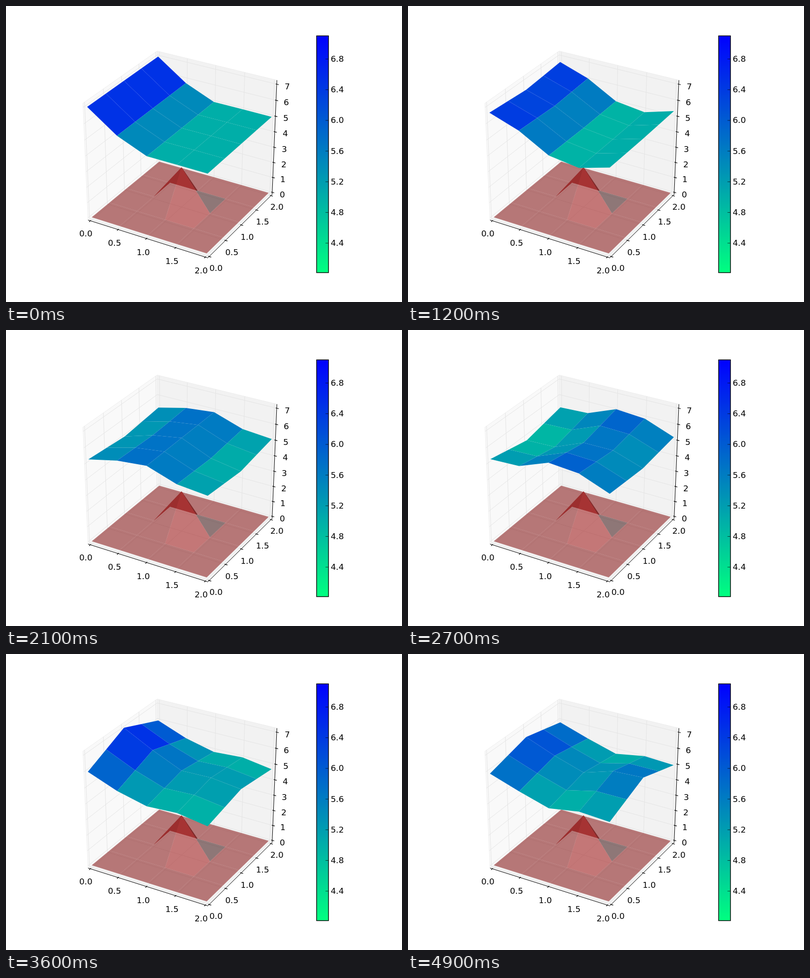
Animation of 800x600 px, one loop 5 s. Source, as an HTML page with a canvas:

```html
<!DOCTYPE html>
<html lang="en">
<head>
<meta charset="utf-8">
<title>Water surface over a peak</title>
<style>
  html, body { margin: 0; width: 100%; height: 100%; overflow: hidden; background: #fff; }
  canvas { display: block; }
</style>
</head>
<body>
<canvas id="stage" width="800" height="600"></canvas>
<script>
const ctx = document.getElementById('stage').getContext('2d');
const STEP = 100, STEPS = 50;
const ZMAX = 7.1, VMIN = 4.014, VMAX = 7.1;
const LO = -1 / 48, HI = 49 / 48;   // pane limits in unit space
const TICKS = [0, 0.5, 1, 1.5, 2];
const INK = '#000', GRID = '#e5e5e5';

// Standing waves of the basin: half waves along x and y, amplitude,
// degrees per step, phase. Waves along y build up as the peak scatters them.
const REST = 5.43;
const WAVES = [
  [1, 0, 0.765, 30.8, 0],
  [2, 0, 0.5, 58.8, 0],
  [3, 0, 0.24, 80, 0],
  [4, 0, 0.0625, 3, 0],
  [0, 2, 0.31, 55.4, -12],
  [1, 2, 0.16, 65.5, -33],
  [2, 2, 0.12, 83, 22]
];

function height(i, j, n) {
  const fade = Math.exp(-0.004 * n);
  const grow = Math.max(0, Math.min(1, (n - 4) / 24));
  return WAVES.reduce((z, [kx, ky, amp, speed, phase]) =>
    z + amp * (ky ? grow : fade) * Math.cos((speed * n + phase) * Math.PI / 180)
      * Math.cos(kx * i * Math.PI / 4) * Math.cos(ky * j * Math.PI / 4), REST);
}

// Perspective camera at elevation 30, azimuth -60; unit cube to pixels
function unit(x, y, z) {
  x -= 0.5; y -= 0.5; z -= 0.5;
  const r = Math.sqrt(3) / 2;
  const d = 10 - (r / 2 * x - 0.75 * y + 0.5 * z);
  return [354.7 + 2681 * (r * x + 0.5 * y) / d,
          293.5 - 2594.6 * (-0.25 * x + r / 2 * y + r * z) / d];
}
const at = (x, y, z) => unit(x / 2, y / 2, z / ZMAX);

function trace(pts) {
  ctx.beginPath();
  pts.forEach(p => ctx.lineTo(p[0], p[1]));
}
function fill(pts, color) {
  trace(pts);
  ctx.closePath();
  ctx.fillStyle = color;
  ctx.fill();
}
function line(pts, color, width = 1) {
  trace(pts);
  ctx.strokeStyle = color;
  ctx.lineWidth = width;
  ctx.stroke();
}
// Text centred on y, snapped to whole pixels
function text(s, x, y, centred = true) {
  ctx.font = '16.67px "DejaVu Sans", sans-serif';
  ctx.fillStyle = INK;
  const left = centred ? x - ctx.measureText(s).width / 2 : x;
  ctx.fillText(s, Math.round(left), Math.round(y + 6));
}

function drawPanes() {
  const a = unit(LO, LO, LO), b = unit(HI, LO, LO), c = unit(HI, HI, LO), d = unit(LO, HI, LO);
  const e = unit(LO, LO, HI), f = unit(HI, HI, HI), g = unit(LO, HI, HI);
  fill([a, d, g, e], '#f9f9f9');
  fill([d, c, f, g], '#f2f2f2');
  fill([a, b, c, d], '#f4f4f4');
  line([a, e, g, f], '#eeeeee');
  line([g, d], '#eeeeee');
  for (const t of TICKS) {
    const u = t / 2;
    line([unit(u, LO, LO), unit(u, HI, LO), unit(u, HI, HI)], GRID);
    line([unit(HI, u, LO), unit(LO, u, LO), unit(LO, u, HI)], GRID);
  }
  for (let z = 0; z <= 7; z++) {
    const w = z / ZMAX;
    line([unit(LO, LO, w), unit(LO, HI, w), unit(HI, HI, w)], GRID);
  }
}

function drawAxes() {
  line([unit(LO, LO, LO), unit(HI, LO, LO), unit(HI, HI, LO), unit(HI, HI, HI)], INK);
  const out = 1 / 60, inn = 1 / 120;
  TICKS.forEach((t, i) => {
    const u = t / 2, s = t.toFixed(1);
    line([unit(u, LO - out, LO), unit(u, LO + inn, LO)], INK, 1.2);
    line([unit(HI + out, u, LO), unit(HI - inn, u, LO)], INK, 1.2);
    text(s, 161.5 + 57.2 * i + 0.25 * i * i, 461 + 18.75 * i);
    text(s, 424 + 32.6 * i - 0.43 * i * i, 531.3 - 32.3 * i + 0.3 * i * i);
  });
  for (let z = 0; z <= 7; z++) {
    const w = z / ZMAX;
    line([unit(HI + out, HI, w), unit(HI - inn, HI, w)], INK, 1.2);
    text(String(z), 558.3 + 1.38 * z, 381.8 - 30.4 * z - 0.12 * z * z);
  }
}

function drawBed() {
  const red = r => `rgba(${r},0,0,0.51)`;
  for (let j = 3; j >= 0; j--) {
    for (let i = 0; i < 4; i++) {
      if (i % 3 && j % 3) continue;   // the peak covers the middle cells
      const x = i / 2, y = j / 2;
      fill([at(x, y, 0), at(x + .5, y, 0), at(x + .5, y + .5, 0), at(x, y + .5, 0)], red(125));
    }
  }
  const top = at(1, 1, 2.48);
  const west = at(.5, 1, 0), east = at(1.5, 1, 0), south = at(1, .5, 0), north = at(1, 1.5, 0);
  fill([top, east, at(1.5, 1.5, 0), north], red(45));
  fill([at(.5, .5, 0), south, top, west], red(127));
  fill([south, at(1.5, .5, 0), east, top], red(151));
  // far side seen through the near faces
  const split = [344, 361.8];
  fill([west, top, split, at(.5, 1.5, 0)], '#9c2e2e');
  fill([top, north, split], '#a63333');
  fill([top, north, [383.8, 374]], '#7c2a2a');
}

function drawWater(n) {
  for (let j = 3; j >= 0; j--) {
    for (let i = 0; i < 4; i++) {
      let sum = height(i, j, n);   // the first corner counts twice in the colour
      const quad = [[0, 0], [1, 0], [1, 1], [0, 1]].map(([p, q]) => {
        const z = height(i + p, j + q, n);
        sum += z;
        return at((i + p) / 2, (j + q) / 2, z);
      });
      const v = Math.max(0, Math.min(1, (VMAX - sum / 5) / (VMAX - VMIN)));
      fill(quad, `rgb(0,${Math.round(255 * v)},${Math.round(255 - 127.5 * v)})`);
    }
  }
}

function drawBar() {
  const g = ctx.createLinearGradient(0, 60, 0, 540);
  g.addColorStop(0, '#0000ff');
  g.addColorStop(1, '#00ff80');
  ctx.fillStyle = g;
  ctx.fillRect(627, 60, 24, 480);
  ctx.strokeStyle = INK;
  ctx.lineWidth = 1.4;
  ctx.strokeRect(627.5, 60.5, 24, 480);
  for (let i = 0; i < 7; i++) {
    const y = 107 + 62.2 * i;
    line([[645.5, y + 0.5], [651, y + 0.5]], INK, 0.7);
    text((6.8 - 0.4 * i).toFixed(1), 656, y, false);
  }
}

function draw(n) {
  ctx.fillStyle = '#fff';
  ctx.fillRect(0, 0, 800, 600);
  drawPanes();
  drawAxes();
  drawBed();
  drawWater(n);
  drawBar();
}

const start = performance.now();
function tick() {
  draw(Math.floor(Math.max(0, performance.now() - start) / STEP) % STEPS);
  requestAnimationFrame(tick);
}
tick();
</script>
</body>
</html>
```
